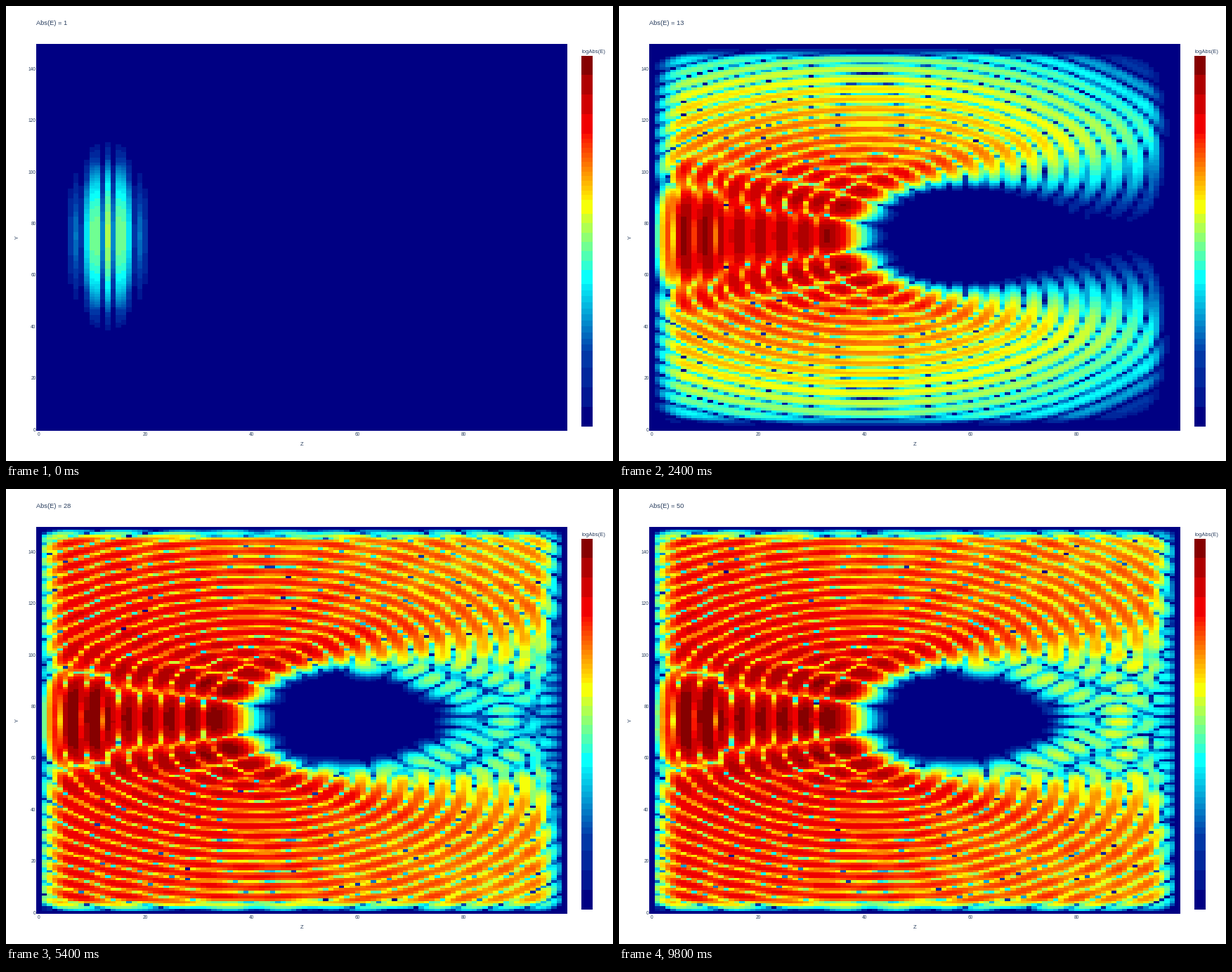
Write a matplotlib script that moves like this. It is 864 px wide and 648 px high and loops after 10 s.

```python
import numpy as np
import matplotlib.pyplot as plt
from matplotlib.animation import FuncAnimation

W, H, DPI = 864, 648, 100
NY, NZ, FRAMES = 150, 100, 50
INK = "#2a3f5f"
plt.rcParams["font.family"] = "Liberation Sans"

# ---- wave simulation: a beam from a line source meets a round plasma ----
WAVELENGTH = 8.0            # in cells
STEPS = 16                  # time steps per wave period
DT = 0.5
LAYER, LOSS = 6, 2.7        # absorbing border: depth in cells, peak loss
MAGNETIC = 0.5              # magnetic share of the loss; below 1 the border reflects a little
SOURCE_Z, WAIST, RISE = 13, 17.5, 8.0
PHASE = 0.18 * np.pi
CENTRE_Z, CENTRE_Y, RADIUS, SKIN, DENSITY = 55, 75, 20.0, 2.5, 2.2


def damping(pos, size, share=1.0):
    """Decay and gain factors for field samples at the given positions."""
    edge = np.minimum(pos, size - 1 - pos)
    depth = np.clip((LAYER - edge) / LAYER, 0, 1)
    x = share * LOSS * depth * DT / 2
    return (1 - x) / (1 + x), DT / (1 + x)


def simulate():
    y, z = np.arange(NY), np.arange(NZ)
    ez_a, ez_b = damping(z[1:-1], NZ)
    hz_a, hz_b = damping(z[:-1] + 0.5, NZ, MAGNETIC)
    ey_a, ey_b = (f[:, None] for f in damping(y[1:-1], NY))
    hy_a, hy_b = (f[:, None] for f in damping(y[:-1] + 0.5, NY, MAGNETIC))

    r = np.hypot(z[None, :] - CENTRE_Z, y[:, None] - CENTRE_Y)
    density = DENSITY / 2 * (1 + np.tanh((RADIUS - r) / SKIN))
    plasma = (2 * np.pi / WAVELENGTH) ** 2 * density
    beam = np.exp(-((y - CENTRE_Y) / WAIST) ** 2)

    inner = np.zeros((NY, NZ))
    inner[1:-1, 1:-1] = 1
    e, ea, eb, j = (np.zeros((NY, NZ)) for _ in range(4))
    hy = np.zeros((NY, NZ - 1))
    hx = np.zeros((NY - 1, NZ))
    shots = []
    for step in range(1, FRAMES * STEPS + 1):
        hy = hz_a * hy + hz_b * np.diff(e, axis=1)
        hx = hy_a * hx + hy_b * np.diff(e, axis=0)
        j += DT * plasma * e
        ea[:, 1:-1] = ez_a * ea[:, 1:-1] + ez_b * np.diff(hy, axis=1)
        eb[1:-1] = ey_a * eb[1:-1] + ey_b * np.diff(hx, axis=0)
        ea -= DT * j
        t = step / STEPS
        rise = 1 - np.exp(-(t / RISE) ** 1.7)
        ea[:, SOURCE_Z] += rise * np.sin(2 * np.pi * t + PHASE) * beam
        ea *= inner
        eb *= inner
        e = ea + eb
        if step % STEPS == 0:
            shots.append(0.945 + np.log10(np.abs(e) + 1e-12) / 4)
    return shots


# ---- stepped colour scale ----
BAR_TOP, BAR_BOTTOM = 71, 599
KNOTS = np.array([(0, 0, 131), (0, 60, 170), (5, 255, 255),
                  (255, 255, 0), (250, 0, 0), (128, 0, 0)]) / 255


def shade(v):
    at = np.linspace(0, 1, len(KNOTS))
    return np.stack([np.interp(v, at, KNOTS[:, c]) for c in range(3)], axis=-1)


edges = np.concatenate([
    [599, 571, 543, 515],
    np.linspace(491, 396, 12),
    np.linspace(376, 296, 7),
    np.linspace(276, 182, 15),
    [154, 126, 98, 71],
])
levels = (BAR_BOTTOM - edges) / (BAR_BOTTOM - BAR_TOP)
mids = (levels[1:] + levels[:-1]) / 2
mids[0], mids[-1] = 0, 0.99
palette = shade(mids)


def colourise(v):
    return palette[np.digitize(v, levels[1:-1])]


# ---- stage, in pixels from the top left ----
fig = plt.figure(figsize=(W / DPI, H / DPI), dpi=DPI, facecolor="white")
ax = fig.add_axes([0, 0, 1, 1])
ax.axis("off")

LEFT, RIGHT, TOP, BOTTOM = 43.0, 798.8, 54.0, 604.6
DX, DY = (RIGHT - LEFT) / NZ, (BOTTOM - TOP) / NY


def label(x, y, text, px, **kw):
    return ax.text(x, y, text, fontsize=px * 72 / DPI, color=INK, **kw)


shots = simulate()
field = ax.imshow(colourise(shots[0]), extent=(LEFT, RIGHT, BOTTOM, TOP),
                  origin="lower", interpolation="nearest", aspect="auto")

for low, high, colour in zip(edges[:-1], edges[1:], palette):
    ax.add_patch(plt.Rectangle((819, high), 16.3, low - high, facecolor=colour,
                               edgecolor="none", antialiased=False))

for k in range(0, NZ, 20):
    label(LEFT + (k + 0.5) * DX, 612.2, str(k), 6.54, ha="center")
for k in range(0, NY, 20):
    label(42.6, BOTTOM - (k + 0.5) * DY + 2.9, str(k), 6.54, ha="right")
label(421, 626.5, "Z", 7.63, ha="center")
label(16.3, 329, "Y", 7.63, ha="center", va="center", rotation=90)
label(819, 67, "logAbs(E)", 7.63)
title = label(43.2, 27, "Abs(E) = 1", 9.26)

ax.set_xlim(0, W)
ax.set_ylim(H, 0)


def draw(i):
    field.set_data(colourise(shots[i]))
    title.set_text(f"Abs(E) = {i + 1}")
    return field, title


anim = FuncAnimation(fig, draw, frames=FRAMES, interval=200,
                     repeat=True, repeat_delay=0)
plt.show()
```
